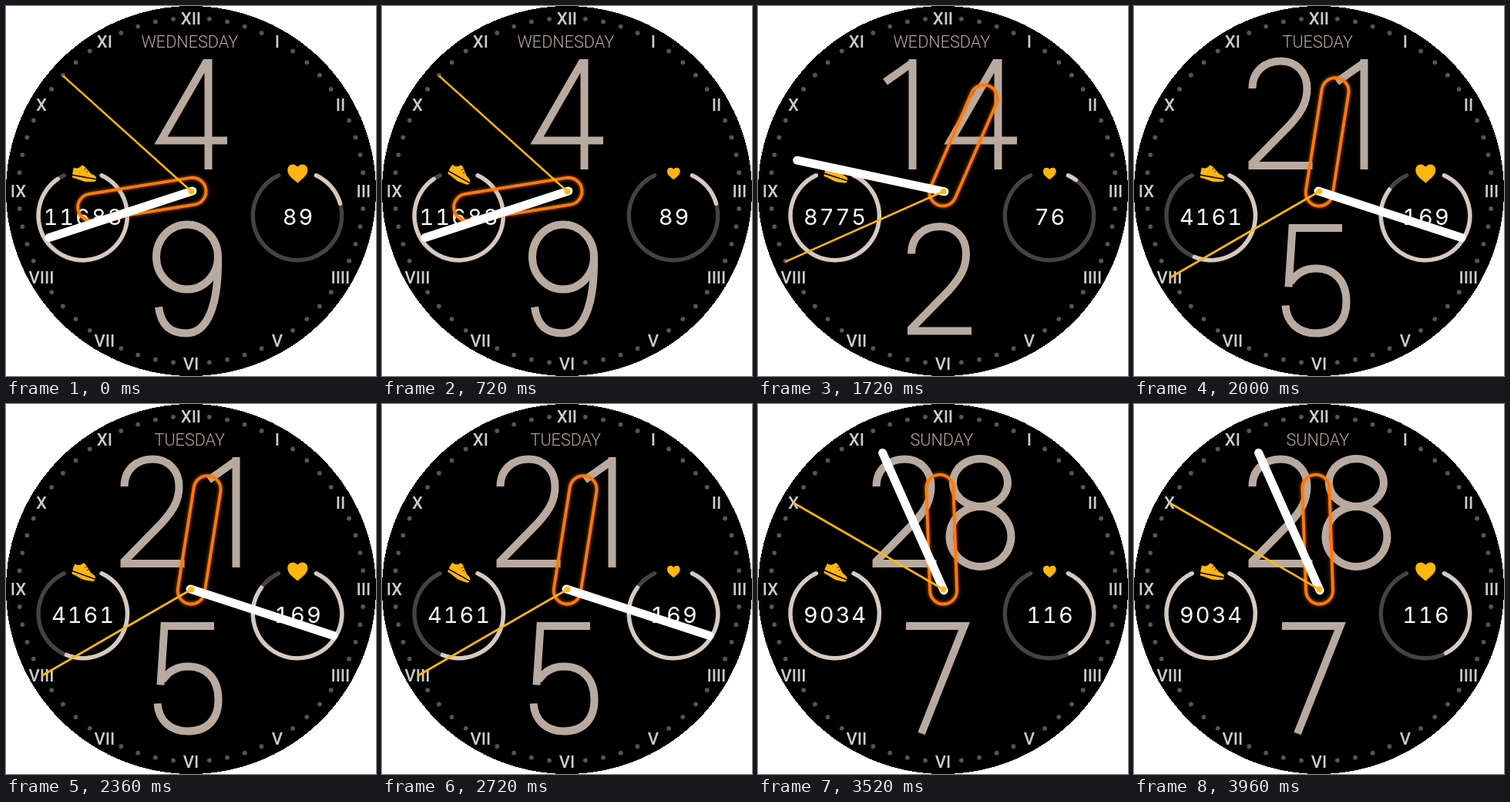
Animation, 480 px wide and 480 px high, one loop 4000 ms. Source, as an HTML page:

```html
<!DOCTYPE html>
<html lang="en">
<head>
<meta charset="utf-8">
<title>Watch face</title>
<style>
  html, body { margin: 0; width: 100%; height: 100%; overflow: hidden; background: #fff; }
  svg { display: block; width: 100vw; height: 100vh; }
  text { text-anchor: middle; }
  .hour { font: 500 22px Roboto, "Liberation Sans", sans-serif; fill: #ccc; }
  .day { font: 300 21.6px Roboto, sans-serif; fill: #b9aaa0; }
  .value { font: 400 29px Inter, sans-serif; font-variant-numeric: tabular-nums; letter-spacing: 2px; fill: #fff; }
  .digits { fill: none; stroke: #b9aaa0; stroke-width: 10; stroke-miterlimit: 6; }
  .ring { fill: none; stroke-width: 5.4; stroke-linecap: round; }
  .capsule { fill: none; stroke: #ff7a0c; }
</style>
</head>
<body>
<svg viewBox="0 0 480 480">
  <defs>
    <filter id="glow" x="-60%" y="-30%" width="220%" height="160%"><feGaussianBlur stdDeviation="2"/></filter>
  </defs>
  <circle cx="240" cy="240" r="240" shape-rendering="crispEdges"/>
  <g id="dial"></g>
  <text id="day" class="day" x="238.3" y="54"></text>
  <g id="date" class="digits" transform="translate(240 212)"></g>
  <g id="month" class="digits" transform="translate(240 426.5)"></g>

  <g class="ring">
    <path id="stepTrack" stroke="#45423f"/><path id="stepArc" stroke="#d6c9be"/>
    <path id="pulseTrack" stroke="#45423f"/><path id="pulseArc" stroke="#d6c9be"/>
  </g>
  <text id="steps" class="value" x="100.5" y="284"></text>
  <text id="pulse" class="value" x="379.5" y="284"></text>

  <g id="shoe" fill="#ffb60d">
    <path d="M-15-1L-13.500-8C-10-6-6-7-3-11L0-10 9 0C13 2 16 3 16 6.500L-15 1Z"/>
    <path d="M-15.500 2.500L16 8C15 10.500 13 10.500 10 10.500H2C-4 9.500-10 6-15 5.500Z"/>
    <path d="M0-5l2-1.500M3-2l2-1.500" stroke="#000" stroke-width=".8"/>
  </g>
  <path id="heart" fill="#ffb60d" d="M0 13C-10 5-14 1-14-5C-14-10-11-13-6.800-13C-4-13-1.500-11.500 0-9.300C1.500-11.500 4-13 6.800-13C11-13 14-10 14-5C14 1 10 5 0 13Z"/>

  <g id="hourHand">
    <rect class="capsule" x="-17.500" y="-149" width="35" height="168" rx="17.500" stroke-width="5" opacity=".6" filter="url(#glow)"/>
    <rect class="capsule" x="-17.500" y="-149" width="35" height="168" rx="17.500" stroke-width="3.800"/>
  </g>
  <path id="minuteHand" d="M0 1.500V-194" stroke="#fff" stroke-width="11" stroke-linecap="round"/>
  <g id="secondHand" fill="#ffb60d">
    <path d="M0 0V-224" stroke="#ffb60d" stroke-width="2.600"/>
    <circle r="3.800"/>
  </g>
</svg>
<script>
const $ = id => document.getElementById(id);
const LOOP = 4000;
const GAP = 25;
const RADIUS = 57.7;

// Digit strokes: x from the cell centre, y from the baseline.
const DIGITS = {
  1: "M9.500 0V-143M-26-113.500L9.500-138.500",
  2: "M-41-105C-41-127-25-140.500-4-140.500C16-140.500 30-126 30-105C30-86 22-74 8-58L-42.500-6.500M-46-5H37",
  4: "M22.500 0V-138H19L-39-37.500H47",
  5: "M30-138.500H-34.500L-39.500-62M-37-68C-29-80-18-86-4-86C20-86 35.500-70 35.500-43C35.500-16 20-2-4-2C-27-2-42-16-43.500-38",
  7: "M-48-138.500H27.500L-28 1",
  8: "M0-141A35.500 31 0 1 1-.1-141ZM0-79A40 39 0 1 1-.1-79Z",
  9: "M35-101A40 42 0 1 0-45-101A40 42 0 1 0 35-101C36-40 22-2-6-2C-27-2-39-13-42-36"
};

const SCENES = [
  { day: "WEDNESDAY", date: [[4, 0]], month: 9, steps: 11683, goal: .97, pulse: 89, time: [8, 42, 52] },
  { day: "WEDNESDAY", date: [[1, -49], [4, 49]], month: 2, steps: 8775, goal: 1, pulse: 76, time: [12, 47, 41] },
  { day: "TUESDAY", date: [[2, -45.5], [1, 49]], month: 5, steps: 4161, goal: .57, pulse: 169, time: [12, 18, 40] },
  { day: "SUNDAY", date: [[2, -45.5], [8, 48.5]], month: 7, steps: 9034, goal: 1, pulse: 116, time: [11, 56, 50] }
];

function polar(cx, cy, r, deg) {
  const a = deg * Math.PI / 180;
  return [cx + r * Math.sin(a), cy - r * Math.cos(a)];
}

function arc(cx, part) {
  const sweep = part * (360 - 2 * GAP);
  const from = polar(cx, 272, RADIUS, GAP);
  const to = polar(cx, 272, RADIUS, GAP + sweep);
  return `M${from}A${RADIUS} ${RADIUS} 0 ${sweep > 180 ? 1 : 0} 1 ${to}`;
}

const glyph = ([digit, x]) => `<path transform="translate(${x})" d="${DIGITS[digit]}"/>`;

function drawDial() {
  const names = ["XII", "I", "II", "III", "IIII", "V", "VI", "VII", "VIII", "IX", "X", "XI"];
  let out = "";
  for (let i = 0; i < 60; i++) {
    const [x, y] = polar(240.4, 239.6, 224, i * 6);
    out += i % 5
      ? `<circle cx="${x}" cy="${y}" r="2.9" fill="#555"/>`
      : `<text class="hour" x="${x - .5}" y="${y + 8}">${names[i / 5]}</text>`;
  }
  $("dial").innerHTML = out;
  $("stepTrack").setAttribute("d", arc(99.7, 1));
  $("pulseTrack").setAttribute("d", arc(378, 1));
}

function turn(id, deg) {
  $(id).setAttribute("transform", `translate(240.500 240.500) rotate(${deg})`);
}

let shown = -1;
function showScene(index) {
  if (index === shown) return;
  shown = index;
  const s = SCENES[index];
  const [h, m, sec] = s.time;
  $("day").textContent = s.day;
  $("date").innerHTML = s.date.map(glyph).join("");
  $("month").innerHTML = glyph([s.month, 0]);
  $("steps").textContent = s.steps;
  $("pulse").textContent = s.pulse;
  $("stepArc").setAttribute("d", arc(99.7, s.goal));
  $("pulseArc").setAttribute("d", arc(378, (s.pulse - 72) / 107));
  turn("hourHand", h * 30 + m / 2);
  turn("minuteHand", m * 6);
  turn("secondHand", sec * 6);
}

function render(ms) {
  const t = ms % LOOP;
  showScene(Math.floor(t / 1000));
  const swing = 1 - Math.abs(1 - t % 2000 / 1000);
  $("shoe").setAttribute("transform", `translate(101.300 217.500) rotate(${27 * swing})`);
  const beat = t % 1000;
  const size = beat >= 500 && beat < 900 ? .6 : .93;
  $("heart").setAttribute("transform", `translate(378.300 217.500) scale(${size})`);
}

drawDial();
const start = performance.now();
function tick() {
  render(performance.now() - start);
  requestAnimationFrame(tick);
}
tick();
</script>
</body>
</html>
```
